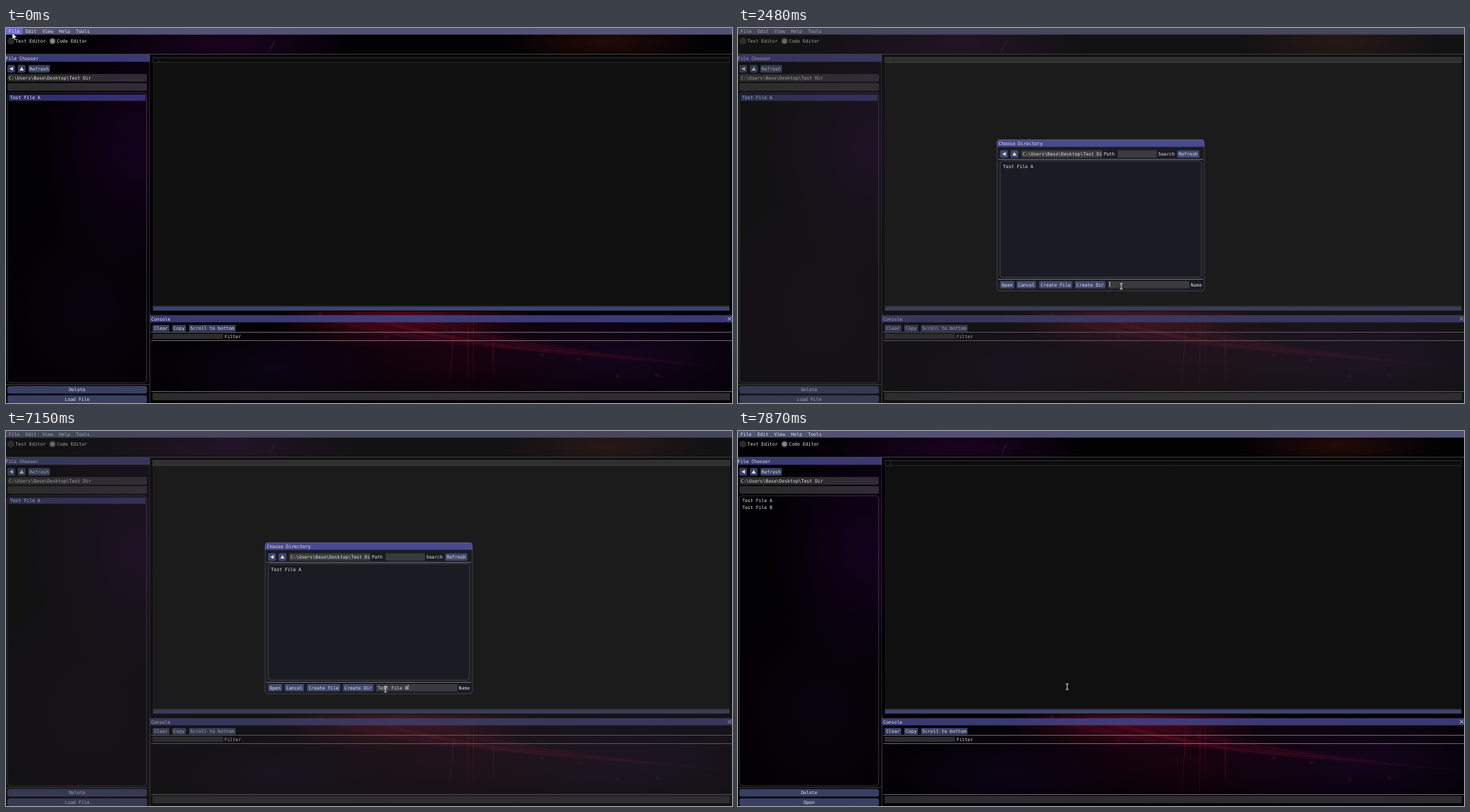
Recreate the animation shown at these times as an HTML page with a canvas. Size 1040 by 538 pixels, loop 8 s.

```html
<!DOCTYPE html>
<html lang="en">
<head>
<meta charset="utf-8">
<title>Editor: new file</title>
<style>
html, body { margin: 0; width: 100%; height: 100%; overflow: hidden; background: #000; }
canvas { display: block; width: 1040px; height: 538px; }
</style>
</head>
<body>
<canvas id="stage" width="1040" height="538"></canvas>
<script>
const ctx = document.getElementById('stage').getContext('2d');
const LOOP = 8000;
const ADVANCE = 3.94;
const FONT = '6.54px "DejaVu Sans Mono", monospace';
const PATH = 'C:\\Users\\Base\\Desktop\\Test Dir';
const NAME = 'Test File B';
const KEY_TIMES = [3250, 3550, 3720, 3950, 4730, 4920, 5150, 5520, 5750, 6170, 6450];

const C = {
  text: '#e6e6e6',
  dimText: '#999',
  frame: 'rgba(110,110,110,.39)',
  title: 'rgba(69,69,138,.83)',
  titleActive: 'rgba(82,82,161,.87)',
  menuBar: 'rgba(102,102,140,.8)',
  button: 'rgba(89,102,156,.62)',
  buttonHover: 'rgba(102,122,181,.79)',
  buttonActive: '#758acc',
  header: 'rgba(102,102,230,.45)',
  headerHover: 'rgba(115,115,230,.8)',
  headerActive: 'rgba(135,135,222,.8)',
  popup: 'rgba(28,28,36,.92)',
  border: 'rgba(128,128,128,.5)',
  line: 'rgba(150,150,150,.7)'
};

const clamp = v => Math.max(0, Math.min(1, v));
const ease = v => v * v * (3 - 2 * v);
const within = (p, x, y, w, h) => p.x >= x && p.x < x + w && p.y >= y && p.y < y + h;

function rect(x, y, w, h, color) {
  ctx.fillStyle = color;
  ctx.fillRect(x, y, w, h);
}

function roundPath(x, y, w, h, r) {
  ctx.beginPath();
  ctx.roundRect(x, y, w, h, r);
}

function round(x, y, w, h, r, color) {
  roundPath(x, y, w, h, r);
  ctx.fillStyle = color;
  ctx.fill();
}

function outline(x, y, w, h, r, color = C.border) {
  roundPath(x + .5, y + .5, w - 1, h - 1, r);
  ctx.lineWidth = .8;
  ctx.strokeStyle = color;
  ctx.stroke();
}

function disc(x, y, r, color) {
  ctx.beginPath();
  ctx.arc(x, y, r, 0, Math.PI * 2);
  ctx.fillStyle = color;
  ctx.fill();
}

// y is the middle of the capitals
function text(str, x, y, color = C.text) {
  ctx.fillStyle = color;
  ctx.fillText(str, x, y + 2.4);
}

function button(label, x, y, w, h, color = C.button, r = 1) {
  round(x, y, w, h, r, color);
  text(label, x + (w - label.length * ADVANCE) / 2, y + h / 2);
}

function arrowButton(x, y, dir) {
  round(x, y, 11, 11, 2, C.button);
  const pts = dir === 'left' ? [[3, 5.5], [8, 2.7], [8, 8.3]] : [[5.5, 2.8], [8.4, 7.9], [2.6, 7.9]];
  polygon(pts.map(([a, b]) => [x + a, y + b]), C.text);
}

function polygon(pts, color) {
  ctx.beginPath();
  pts.forEach(([x, y]) => ctx.lineTo(x, y));
  ctx.closePath();
  ctx.fillStyle = color;
  ctx.fill();
}

function glow(x, y, rx, ry, rgb, alpha) {
  ctx.save();
  ctx.translate(x, y);
  ctx.scale(rx, ry);
  const g = ctx.createRadialGradient(0, 0, 0, 0, 0, 1);
  g.addColorStop(0, `rgba(${rgb},${alpha})`);
  g.addColorStop(.5, `rgba(${rgb},${alpha * .5})`);
  g.addColorStop(1, `rgba(${rgb},0)`);
  ctx.fillStyle = g;
  ctx.fillRect(-1, -1, 2, 2);
  ctx.restore();
}

function streak(x0, y0, cx, cy, x1, y1, width, color) {
  const g = ctx.createLinearGradient(x0, y0, x1, y1);
  g.addColorStop(0, `rgba(${color},0)`);
  g.addColorStop(.3, `rgba(${color},.45)`);
  g.addColorStop(1, `rgba(${color},0)`);
  ctx.beginPath();
  ctx.moveTo(x0, y0);
  ctx.quadraticCurveTo(cx, cy, x1, y1);
  ctx.lineWidth = width;
  ctx.strokeStyle = g;
  ctx.stroke();
}

function wallpaper() {
  rect(0, 0, 1040, 538, '#020103');
  glow(190, 170, 150, 190, '32,2,46', .6);
  glow(120, 400, 150, 170, '14,4,20', .6);
  glow(320, 22, 180, 40, '44,6,54', .6);
  glow(860, 20, 150, 36, '52,16,12', .65);
  glow(570, 415, 190, 48, '110,10,34', .75);
  glow(640, 470, 300, 80, '44,4,26', .55);
  glow(900, 470, 240, 90, '30,8,44', .6);
  glow(380, 490, 180, 70, '18,6,32', .6);
  for (let i = 0; i < 9; i++) {
    streak(420 + i * 22, 402, 520 + i * 26, 446 + i * 2, 800 + i * 34, 466 + i * 3,
      i % 3 ? 1 : 5, i % 2 ? '120,14,40' : '78,8,36');
  }
  streak(642, 410, 640, 480, 632, 538, 1, '150,18,50');
  streak(662, 404, 662, 470, 661, 538, 1, '150,18,50');
  streak(670, 404, 669, 470, 669, 520, 1, '140,14,48');
  streak(698, 430, 698, 480, 699, 515, 3, '90,8,48');
  streak(387, 15, 381, 26, 374, 40, 1, '150,70,150');
  for (const [x, y] of [[450, 410], [495, 420], [545, 443], [768, 469], [821, 476], [876, 500], [933, 498]]) {
    disc(x, y, 2.8, 'rgba(110,20,40,.25)');
  }
}

function menuBar(fileColor) {
  rect(0, 0, 1040, 9.5, C.menuBar);
  if (fileColor) rect(0, 0, 23.5, 9.5, fileColor);
  ['File', 'Edit', 'View', 'Help', 'Tools'].forEach((s, i) => text(s, 3.8 + i * 24.1, 4.6));
}

function toolbar() {
  disc(7, 18.8, 5, C.frame);
  text('Text Editor', 13.6, 19);
  disc(66.6, 18.8, 5, C.frame);
  disc(66.6, 18.8, 3.4, 'rgba(230,230,230,.5)');
  text('Code Editor', 73, 19);
  rect(0, 37, 1040, 1, C.border);
}

function chooser(created) {
  rect(0, 38, 206, 10.5, C.title);
  rect(205.5, 38, 1, 500, C.border);
  text('File Chooser', -.5, 43.6);
  arrowButton(2, 53, 'left');
  arrowButton(17, 53, 'up');
  button('Refresh', 32, 53, 31, 11, C.button, 2);
  round(2, 66, 200, 11, 2, C.frame);
  text(PATH, 4, 71.6);
  round(2, 79, 200, 11, 2, C.frame);
  outline(1.5, 92.5, 200.5, 417, 4);
  if (!created) rect(4, 95.5, 196, 9, C.header);
  text('Test File A', 6, 100);
  if (created) text(NAME, 6, 109.6);
  rect(0, 511, 205, 1, C.border);
  button('Delete', 2, 513.5, 200, 11, C.button, 3);
  button(created ? 'Open' : 'Load File', 2, 527, 200, 11, C.button, 3);
}

function editor(focused) {
  rect(206, 38, 834, 369, 'rgba(0,0,0,.85)');
  rect(210, 41, 827, 365, '#101010');
  rect(210, 42, 827, 8, focused ? 'rgba(0,0,0,.25)' : 'rgba(128,128,128,.25)');
  outline(210, 42, 827, 8, 0, 'rgba(160,160,160,.25)');
  text('1', 216.4, 46.4, 'rgba(0,112,112,.6)');
  rect(210, 398, 827, 8, 'rgba(40,48,62,.6)');
  rect(211, 399.7, 825, 5.3, '#3d446c');
}

function consolePanel() {
  rect(206, 412, 834, 10.3, C.title);
  text('Console', 208, 417.3);
  ctx.beginPath();
  ctx.moveTo(1034, 414.6); ctx.lineTo(1039, 419.6);
  ctx.moveTo(1039, 414.6); ctx.lineTo(1034, 419.6);
  ctx.lineWidth = .9;
  ctx.strokeStyle = C.text;
  ctx.stroke();
  button('Clear', 210, 426, 24, 9.5);
  button('Copy', 238, 426, 20, 9.5);
  button('Scroll to bottom', 262, 426, 67, 9.5);
  rect(208, 436, 832, 1, C.line);
  rect(210, 438.5, 101, 7.5, C.frame);
  text('Filter', 313, 442.3);
  rect(208, 448, 832, 1, C.line);
  rect(208, 521, 832, 1, C.line);
  rect(210, 523.5, 827, 10.5, C.frame);
}

function fileMenu(newColor) {
  rect(0, 10, 74.5, 56, C.popup);
  outline(-1, 9.5, 75.5, 56.5, 0);
  if (newColor) rect(1, 13.3, 72, 9.2, newColor);
  ['New', 'Save', 'Save as', 'Delete'].forEach((s, i) => text(s, 3, 18 + i * 9.5));
  text('Ctrl-N', 35, 18, C.dimText);
  text('Ctrl-S', 35, 27.5, C.dimText);
  rect(1, 52, 72, 1, C.border);
  text('Exit', 3, 58.3);
}

function dialog(t, p) {
  const pressing = t >= 7720;
  const focused = t >= 2370 && !pressing;
  const typed = NAME.slice(0, KEY_TIMES.filter(k => t >= k).length);

  round(371, 160, 297, 217.5, 4, C.popup);
  round(371, 160, 297, 10.6, [4, 4, 0, 0], C.titleActive);
  outline(370.7, 159.8, 297.8, 217.8, 4);
  text('Choose Directory', 373.5, 165.6);

  arrowButton(375.5, 175.2, 'left');
  arrowButton(390.5, 175.2, 'up');
  rect(406, 175.5, 116, 10.5, C.frame);
  ctx.save();
  ctx.beginPath();
  ctx.rect(406, 175, 115.5, 11);
  ctx.clip();
  text(PATH, 407.7, 180.8);
  ctx.restore();
  text('Path', 524, 180.8);
  rect(544, 175.5, 56, 10.5, C.frame);
  text('Search', 602, 180.8);
  button('Refresh', 629.3, 175.5, 31.5, 10.5);
  rect(373, 188, 293, 1, C.line);

  outline(375, 190, 289.5, 168, 4);
  text('Test File A', 379.8, 198.6);
  rect(373, 360, 293, 1, C.line);

  for (const [label, x, w] of [['Open', 375.5, 20], ['Cancel', 399.3, 27.5], ['Create File', 431.3, 47.5], ['Create Dir', 482.8, 43.5]]) {
    const hover = within(p, x, 363, w, 10.5);
    button(label, x, 363, w, 10.5, !hover ? C.button : pressing ? C.buttonActive : C.buttonHover);
  }
  rect(530, 363, 116.5, 10.5, C.frame);
  text(typed, 532.3, 368.2);
  if (focused) rect(532.3 + typed.length * ADVANCE, 364, .8, 7, C.text);
  text('Name', 648.6, 368.2);
}

// [start, end, x, y]: eased legs of the pointer's route
const LEGS = [
  [520, 620, 9.3, 11.5],
  [740, 810, 9.3, 15.3],
  [1300, 1800, 508, 339],
  [1810, 2180, 548.5, 370.2],
  [7060, 7620, 471, 366.5]
];

function pointerAt(t) {
  let x = 9, y = 7;
  for (const [a, b, nx, ny] of LEGS) {
    const k = ease(clamp((t - a) / (b - a)));
    x += (nx - x) * k;
    y += (ny - y) * k;
  }
  return { x, y };
}

function drawPointer(p, beam) {
  ctx.lineJoin = 'round';
  if (beam) {
    const x = p.x + .5, y = p.y + .4;
    ctx.beginPath();
    ctx.moveTo(x - 2, y - 4); ctx.lineTo(x + 2, y - 4);
    ctx.moveTo(x, y - 4); ctx.lineTo(x, y + 4);
    ctx.moveTo(x - 2, y + 4); ctx.lineTo(x + 2, y + 4);
    ctx.lineWidth = 1;
    ctx.strokeStyle = '#dcdcdc';
    ctx.stroke();
    return;
  }
  const shape = [[0, 0], [0, 9.2], [2.2, 7.2], [3.6, 10.4], [5.1, 9.8], [3.7, 6.7], [6.6, 6.6]];
  polygon(shape.map(([a, b]) => [p.x + a, p.y + b]), '#fff');
  ctx.lineWidth = .5;
  ctx.strokeStyle = '#000';
  ctx.stroke();
}

function draw(t) {
  const p = pointerAt(t);
  const menuOpen = t >= 150 && t < 1140;
  const modal = t >= 1140 && t < 7820;
  const created = t >= 7820;
  const click = [150, 1040, 2370, 7720].some(c => t >= c && t < c + 100);
  const onFile = p.y < 9.5;

  ctx.font = FONT;
  ctx.textRendering = 'geometricPrecision';
  wallpaper();
  toolbar();
  chooser(created);
  editor(t < 150 || created);
  consolePanel();
  menuBar(onFile ? C.headerHover : menuOpen ? C.header : null);

  if (menuOpen) {
    const onNew = p.y > 13.3;
    fileMenu(!onNew ? null : click ? C.headerActive : C.headerHover);
  }
  if (modal) {
    rect(0, 0, 1040, 538, `rgba(51,51,51,${.35 * clamp((t - 1130) / 170)})`);
    dialog(t, p);
  }
  if (click) disc(p.x - .4, p.y + .3, 6.8, 'rgba(218,206,20,.8)');
  drawPointer(p, t >= 7870 || (modal && within(p, 530, 363, 117, 11)));
}

function tick() {
  draw(performance.now() % LOOP);
  requestAnimationFrame(tick);
}
tick();
</script>
</body>
</html>
```
